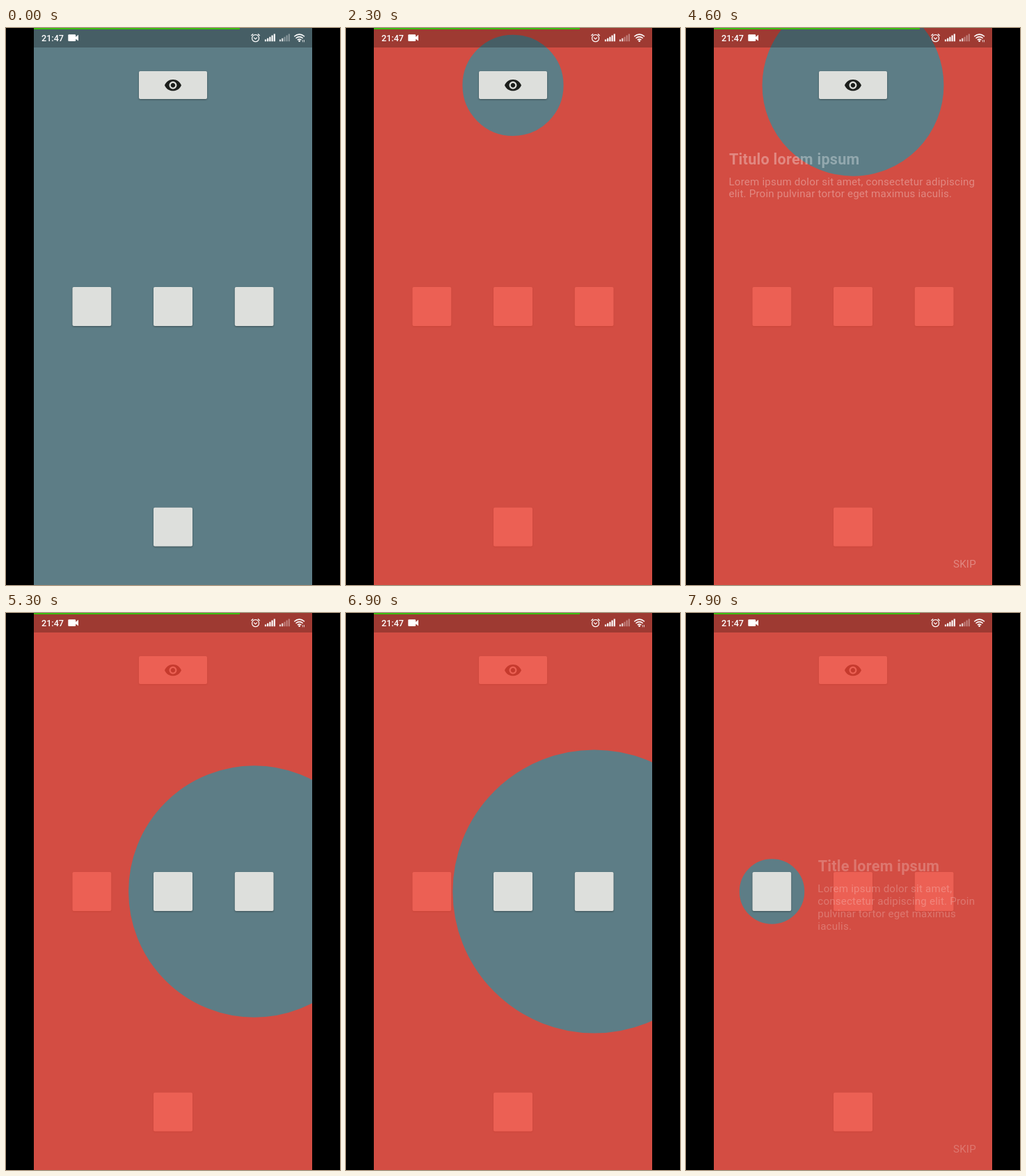
Recreate the animation shown at these times as an HTML page. Size 480 px wide and 800 px high, loop 8000 ms.

```html
<!DOCTYPE html>
<html lang="en">
<head>
<meta charset="utf-8">
<title>Coach marks</title>
<style>
  html, body { margin: 0; width: 100%; height: 100%; overflow: hidden; background: #000; }
  svg { display: block; width: 100vw; height: 100vh; }
  text { font-family: Roboto, "Open Sans", sans-serif; fill: #fff; font-size: 15.1px; letter-spacing: .2px; }
  .title { font-size: 21.6px; font-weight: 700; letter-spacing: .25px; }
  .clock { font-size: 12.6px; font-weight: 500; letter-spacing: 0; }
  .card { fill: #dddfdc; filter: drop-shadow(0 1.5px 1.2px rgba(0, 0, 0, .38)); }

  /* The overlay is a 1000px stroke; its hole has radius r - 500. */
  .shade { fill: none; stroke: rgb(240, 66, 50); stroke-opacity: .8; stroke-width: 1000px; animation: 8s ease infinite; }
  .shade.eye { animation-name: shade-eye; }
  .shade.right { animation-name: shade-right; }
  .shade.left { animation-name: shade-left; }

  @keyframes shade-eye {
    0%, 21.875% { r: 1369.6px; }
    29.375%, 41.875% { r: 569.6px; }
    35.625%, 48.125% { r: 577.6px; animation-timing-function: cubic-bezier(.75, 0, .75, .9); }
    54.375% { r: 569.6px; }
    55% { r: 569.6px; animation-timing-function: cubic-bezier(.75, 0, .75, .9); }
    62.5%, 100% { r: 1369.6px; }
  }
  @keyframes shade-right {
    0%, 62.3% { r: 1344px; }
    69.8% { r: 544px; }
    76.05% { r: 552px; animation-timing-function: cubic-bezier(.75, 0, .75, .9); }
    82.3% { r: 544px; }
    82.5% { r: 544px; animation-timing-function: cubic-bezier(.75, 0, .75, .9); }
    90%, 100% { r: 1344px; }
  }
  @keyframes shade-left {
    0%, 90% { r: 1344px; }
    97.5% { r: 544px; animation-timing-function: linear; }
    100% { r: 549.4px; }
  }

  .tip { opacity: 0; animation: 8s linear infinite; }
  .tip.eye { animation-name: tip-eye; }
  .tip.right { animation-name: tip-right; }
  .tip.left { animation-name: tip-left; }

  @keyframes tip-eye {
    0%, 29.375%, 58.75%, 100% { opacity: 0; }
    33.125%, 55% { opacity: 1; }
  }
  @keyframes tip-right {
    0%, 69.8%, 86.25%, 100% { opacity: 0; }
    73.55%, 82.5% { opacity: 1; }
  }
  @keyframes tip-left {
    0%, 97.875% { opacity: 0; }
    100% { opacity: .567; }
  }

  .traffic { animation: traffic 8s step-end infinite; }
  @keyframes traffic {
    0%, 15%, 50% { opacity: .75; }
    6%, 20%, 93%, 100% { opacity: 0; }
  }
</style>
</head>
<body>
<svg viewBox="0 0 480 800" preserveAspectRatio="none">
  <defs>
    <text id="skip" x="384" y="774.5">SKIP</text>
  </defs>

  <!-- app page -->
  <rect x="40" width="400" height="800" fill="#5d7d86"/>
  <rect class="card" x="191" y="62" width="98" height="40" rx="2"/>
  <path transform="translate(226.9 69.1) scale(1.09)" fill="#1c1f1c" d="M12 4.5C7 4.5 2.73 7.61 1 12c1.73 4.39 6 7.5 11 7.5s9.27-3.11 11-7.5c-1.73-4.39-6-7.5-11-7.5zM12 17c-2.76 0-5-2.24-5-5s2.24-5 5-5 5 2.24 5 5-2.24 5-5 5zm0-8c-1.66 0-3 1.34-3 3s1.34 3 3 3 3-1.34 3-3-1.34-3-3-3z"/>
  <rect class="card" x="95.5" y="372" width="55.7" height="56" rx="2"/>
  <rect class="card" x="212" y="372" width="56" height="56" rx="2"/>
  <rect class="card" x="328.8" y="372" width="55.7" height="56" rx="2"/>
  <rect class="card" x="212" y="688.7" width="56" height="55.7" rx="2"/>

  <!-- overlay -->
  <circle class="shade eye" cx="240" cy="82.3" r="1369.6"/>
  <circle class="shade right" cx="356.8" cy="400" r="1344"/>
  <circle class="shade left" cx="123.5" cy="400" r="1344"/>

  <!-- hints -->
  <g class="tip eye">
    <text class="title" x="62" y="195.5">Titulo lorem ipsum</text>
    <text y="225.5">
      <tspan x="61.5">Lorem ipsum dolor sit amet, consectetur adipiscing</tspan>
      <tspan x="61.5" dy="17.75">elit. Proin pulvinar tortor eget maximus iaculis.</tspan>
    </text>
    <use href="#skip"/>
  </g>
  <g class="tip right">
    <text class="title" x="61.5" y="283">Multiples content</text>
    <text y="313">
      <tspan x="61.5">Lorem ipsum dolor sit amet, consectetur adipiscing</tspan>
      <tspan x="61.5" dy="17.75">elit. Proin pulvinar tortor eget maximus iaculis.</tspan>
    </text>
    <text class="title" x="61.5" y="371">Multiples content</text>
    <text y="401.3">
      <tspan x="61.5">Lorem ipsum dolor sit amet,</tspan>
      <tspan x="61.5" dy="17.75">consectetur adipiscing elit. Proin</tspan>
      <tspan x="61.5" dy="17.75">pulvinar tortor eget maximus</tspan>
      <tspan x="61.5" dy="17.75">iaculis.</tspan>
    </text>
    <use href="#skip"/>
  </g>
  <g class="tip left">
    <text class="title" x="189.7" y="371">Title lorem ipsum</text>
    <text y="401.3">
      <tspan x="189.3">Lorem ipsum dolor sit amet,</tspan>
      <tspan x="189.3" dy="17.75">consectetur adipiscing elit. Proin</tspan>
      <tspan x="189.3" dy="17.75">pulvinar tortor eget maximus</tspan>
      <tspan x="189.3" dy="17.75">iaculis.</tspan>
    </text>
    <use href="#skip"/>
  </g>

  <!-- status bar -->
  <rect x="40" width="400" height="28" opacity=".25"/>
  <rect x="40" width="296" height="2" fill="#3cbc10"/>
  <text class="clock" x="51" y="18.8">21:47</text>
  <g fill="#fff">
    <rect x="89.3" y="9.3" width="10.9" height="9.8" rx="1.3"/>
    <path d="M99.5 13.2L104 9.8V18.6L99.5 15.2Z"/>
  </g>
  <g fill="none" stroke="#fff" stroke-width="1.2">
    <circle cx="358.6" cy="14.7" r="5"/>
    <path d="M352.4 11L355.2 8.5M364.8 11L362 8.5M356.2 13.6L358.5 15.9L361 13.6"/>
  </g>
  <g stroke="#fff" stroke-width="2.2">
    <path d="M373 19.3V16.5M376.2 19.3V14.8M379.4 19.3V12.8M382.6 19.3V10.6M385.8 19.3V8.4"/>
    <path d="M394 19.3V16.5M397.2 19.3V14.8" opacity=".8"/>
    <path d="M400.4 19.3V12.8M403.6 19.3V10.6M406.8 19.3V8.4" opacity=".35"/>
  </g>
  <g fill="none" stroke="#fff" stroke-width="1.5">
    <path d="M414.2 12.3Q421.6 6 429 12.3M416.5 14.8Q421.6 10.4 426.7 14.8M418.8 17.2Q421.6 14.8 424.4 17.2"/>
    <circle cx="421.6" cy="18.7" r=".6"/>
    <path class="traffic" stroke-width="1" d="M426.3 17V20.3M428.5 17V20.3"/>
  </g>

  <!-- side bars -->
  <path d="M0 0H40V800H0ZM440 0H480V800H440Z"/>
</svg>
</body>
</html>
```
